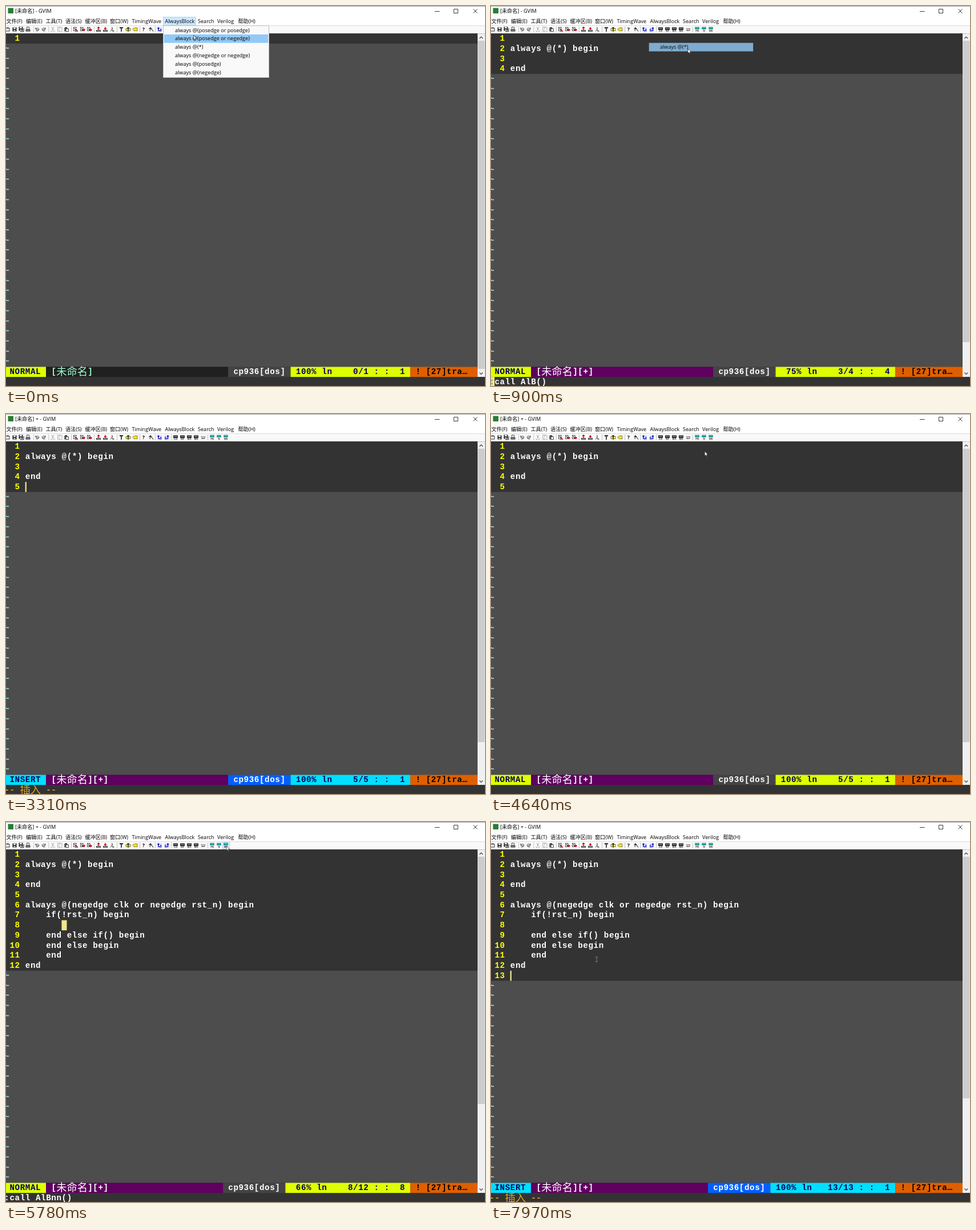
An HTML page for the animation above (8000 ms loop, 839x667 px).

```html
<!DOCTYPE html>
<html lang="zh">
<head>
<meta charset="utf-8">
<title>GVIM</title>
<style>
html, body { margin: 0; width: 100%; height: 100%; overflow: hidden; background: #333; }
svg { display: block; }
text { font: bold 14.2px "Liberation Mono", monospace; letter-spacing: 0.595px; }
.cjk { font: 18.2px "Noto Sans CJK SC", "Noto Sans CJK", sans-serif; letter-spacing: 0; }
.ui { font: 9.1px "Open Sans", "Noto Sans CJK SC", "Noto Sans CJK", sans-serif; letter-spacing: 0; fill: #000; }
</style>
</head>
<body>
<svg id="stage" width="839" height="667" viewBox="0 0 839 667">
  <rect width="839" height="667" fill="#333"/>
  <g id="chrome"></g>
  <g id="hot"></g>
  <g id="icons"></g>
  <g id="editor"></g>
  <g id="caret"></g>
  <g id="menu"></g>
  <g id="mouse"></g>
</svg>
<script>
const LOOP = 8000, CW = 9.115, RH = 17.73, TOP = 48.3, LEFT = -2.85;
const $ = id => document.getElementById(id);
const colX = c => LEFT + c * CW;
const rowY = r => TOP + r * RH;

const rect = (x, y, w, h, fill, extra = '') =>
  `<rect x="${x}" y="${y}" width="${w}" height="${h}" fill="${fill}" ${extra}/>`;
const line = (d, stroke, w = 1) =>
  `<path d="${d}" fill="none" stroke="${stroke}" stroke-width="${w}"/>`;
const esc = s => s.replace(/&/g, '&amp;').replace(/</g, '&lt;');
const ui = (x, y, s) => `<text class="ui" x="${x}" y="${y}">${esc(s)}</text>`;
const mono = (col, row, s, fill) =>
  `<text x="${colX(col) + 0.2}" y="${rowY(row) + 12.8}" fill="${fill}">${esc(s)}</text>`;
const cjk = (col, row, s, fill) =>
  `<text class="cjk" x="${colX(col)}" y="${rowY(row) + 14.5}" fill="${fill}">${s}</text>`;

// ---- window frame, menu bar, toolbar ----
const menuBar = [[0.5, '文件(F)'], [35, '编辑(E)'], [69.5, '工具(T)'], [104, '语法(S)'],
  [138.5, '缓冲区(B)'], [182, '窗口(W)'], [220.5, 'TimingWave'], [278.5, 'AlwaysBlock'],
  [336, 'Search'], [370, 'Verilog'], [406.5, '帮助(H)']];

function drawChrome() {
  $('chrome').innerHTML =
    rect(0, 0, 839, 34, '#fff') + rect(0, 34, 839, TOP - 34, '#f9f9f9') +
    rect(0, 34, 839, 1, '#dcdcdc') + rect(0, 0, 839, 0.8, '#8c8c8c') +
    rect(3.5, 3.5, 9.5, 9.5, '#2a7d32') +
    `<text class="ui" id="title" x="16" y="12"></text>` +
    line('M751 9.5H759.5M784.5 5.5H791.5V12.5H784.5ZM818.5 5.5L825.5 12.5M825.5 5.5L818.5 12.5', '#222', 0.9) +
    rect(275.5, 19.5, 57, 14.5, '#cce8ff', 'id="barHot" stroke="#99d1ff" stroke-width=".8"') +
    menuBar.map(([x, s]) => ui(x, 30, s)).join('');
}

const sheet = (c, w = 5) => rect(-w / 2, -3.5, w, 7, '#fff', `stroke="${c}" stroke-width=".9"`);
const disk = rect(-3.5, -3.5, 7, 7, '#222') + rect(-1.8, -3.2, 3.6, 2.6, '#fff') + rect(-1.5, 1, 3, 2, '#ccc');
const glass = rect(-3.5, -3.5, 4.5, 6, '#fff', 'stroke="#222" stroke-width=".8"') +
  line('M-2 -1.5L1 1.5', '#222', 1.2);
const redArrow = line('M-1 1H4M2 -1L4 1L2 3', '#c00018', 1.3);
const tray = rect(-4, 1, 8, 3, '#333') + rect(-3, 2, 6, 0.8, '#eee');
const loop = s => `<g transform="scale(${s} 1)">${line('M-2.5 -3V0H0M-2 -.5C0 -4 4 -2 3 1C2 3 0 3 -2 2.5M-.5 .8H2', '#333', 1)}</g>`;
const tiny = (s, y, c, size = 4) =>
  `<text class="ui" text-anchor="middle" y="${y}" style="font-size:${size}px;font-weight:700;fill:${c}">${s}</text>`;
const blue = s => rect(-4, -4, 8, 8, '#dfe4ff') + `<g transform="scale(${s} 1)">` +
  line('M-2 3V-3M-3.5 -1.5L-2 -3L-.5 -1.5M-1 2.5H3.5M1 0H3.5', '#1010b0', 1.4) + '</g>';
const chip = s => rect(-4, -3.5, 8, 4.5, '#222') + rect(-3, -1.8, 6, 0.9, '#bbb') + tiny(s, 4, '#222', 3.4);
const teal = s => rect(-3.7, -4.2, 7.4, 4.2, '#108f8f') + rect(-2.5, -3, 5, 0.7, '#9ee') + tiny(s, 4, '#222');

const icons = [
  [3, rect(-4, -2, 7, 5, '#eee', 'stroke="#222" stroke-width=".9"') + line('M-2 -3H2', '#222')],
  [15, disk],
  [27, `<g transform="translate(-1 -1)">${disk}</g>` + line('M4 -2V4H-2', '#222')],
  [38.5, rect(-2, -4, 4, 4, '#fff', 'stroke="#222" stroke-width=".8"') + rect(-4, 0, 8, 3.5, '#333') + rect(-3, 1, 6, 0.8, '#ddd')],
  [54.5, loop(1)], [66.5, loop(-1)],
  [82, line('M-2 -4L1 1.5M2 -4L-1 1.5M-2.5 2A1 1 0 1 0 -1 3M2.5 2A1 1 0 1 1 1 3', '#999', 0.9)],
  [94, `<g transform="translate(-1 -.5)">${sheet('#aaa')}</g><g transform="translate(1.5 .5)">${sheet('#aaa')}</g>`],
  [106, rect(-4, -3, 6, 6.5, '#666') + rect(-2, -4, 2, 2, '#222') + rect(-1, -1, 4.5, 4.8, '#fff', 'stroke="#222" stroke-width=".8"')],
  [122, glass + line('M-1 3L4 3.5M1 0L3.5 3', '#c00018', 1.1)],
  [134, glass + redArrow], [146, glass + redArrow],
  [162, tray + line('M0 1V-4M-2 -2L0 -4L2 -2', '#c00018', 1.4)],
  [174, tray + line('M0 -4V0M-2 -2L0 0L2 -2', '#c00018', 1.4)],
  [186, line('M-1 -3.5A1.5 1.5 0 1 1 -1 -.5L2.5 3.5M0 0L-3 3.5M0 3H3.5', '#333', 1)],
  [202, line('M-3 -2.8H3', '#222', 2) + line('M0 -2V4', '#222', 1.6)],
  [214, rect(-4, -1.5, 8, 4, '#f5e400', 'stroke="#555" stroke-width=".7"') + line('M0 -4V4M-2 -2.5H2', '#222', 1.3)],
  [226, '<path d="M-4.5 0L-2 -2.5H4V2.5H-2Z" fill="#fff000" stroke="#555" stroke-width=".8"/>'],
  [241, tiny('?', 3.4, '#111', 9)],
  [254, line('M-3.5 -.5L-1 -3L1.5 -.5M-1 -3V1M1 0L4 3.5M-3 2H-1', '#222', 1.1)],
  [269, blue(1)], [281.5, blue(-1)],
  ...['CLK', 'INV', 'BUS', 'NEG'].map((s, i) => [297 + 12 * i, chip(s)]),
  [345.5, line('M-4 -1.5H4', '#555', 0.8) + tiny('SEP', 3, '#222')],
  [361, teal('PN')], [373, teal('N')], [385, teal('NN')]
];
const seps = [48, 74.5, 114, 154, 194, 234, 261, 289, 353];

function drawIcons() {
  $('icons').innerHTML =
    icons.map(([x, m]) => `<g transform="translate(${x} 41)">${m}</g>`).join('') +
    seps.map(x => rect(x, 36, 0.8, 10, '#b8b8b8')).join('');
}

// ---- buffer states ----
const code = ['', 'always @(*) begin', '', 'end', '',
  'always @(negedge clk or negedge rst_n) begin', '    if(!rst_n) begin', '',
  '    end else if() begin', '    end else begin', '    end', 'end', ''];

const states = [
  { t: 0, ln: 0, total: 1, col: 1, thumb: 637 },
  { t: 900, ln: 3, total: 4, col: 4, thumb: 590, cmd: ':call AlB()' },
  { t: 2380, ln: 4, total: 4, col: 3, thumb: 590, cmd: ':call AlB()' },
  { t: 3270, ln: 5, total: 5, col: 1, thumb: 576, insert: true },
  { t: 3930, ln: 5, total: 5, col: 1, thumb: 576 },
  { t: 5740, ln: 8, total: 12, col: 8, thumb: 495, cmd: ':call AlBnn()' },
  { t: 6650, ln: 12, total: 12, col: 3, thumb: 495, cmd: ':call AlBnn()' },
  { t: 7290, ln: 13, total: 13, col: 1, thumb: 485, insert: true }
];

function statusBar(s) {
  const changed = s.ln > 0, R = 33;
  const zCol = 56 - String(s.total).length, yCol = zCol - 12;
  const accent = s.insert ? '#00dfff' : '#dfff00', navy = '#00005f';
  const info = changed ? '#fff' : '#9cffd3';
  const band = (a, b, c) => rect(colX(a), rowY(R), colX(b) - colX(a), RH, c);
  const pct = (s.ln ? Math.floor(100 * s.ln / s.total) : 100) + '%';
  const cur = String(s.ln), pos = String(s.col);
  return band(0, 8, accent) + band(8, yCol, changed ? '#5f005f' : '#202020') +
    band(yCol, zCol, s.insert ? '#005fff' : '#444') + band(zCol, 78, accent) +
    rect(colX(78), rowY(R), 826 - colX(78), RH, '#df5f00') +
    mono(1, R, s.insert ? 'INSERT' : 'NORMAL', navy) +
    mono(9, R, '[', info) + cjk(10, R, '未命名', info) + mono(16, R, changed ? '][+]' : ']', info) +
    mono(yCol + 1, R, 'cp936[dos]', '#fff') +
    mono(zCol + 5 - pct.length, R, pct, navy) + mono(zCol + 6, R, 'ln', navy) +
    mono(zCol + 13 - cur.length, R, cur + '/' + s.total + ' : :', navy) +
    mono(77 - pos.length, R, pos, navy) +
    mono(79, R, '! [27]tra…', '#000');
}

function drawEditor(s) {
  let out = rect(0, TOP, 826, 33 * RH, '#4d4d4d') + rect(0, TOP, 826, s.total * RH, '#333');
  for (let r = 0; r < 33; r++) {
    if (r >= s.total) { out += mono(0, r, '~', '#a4e0e0'); continue; }
    const num = String(r + 1), body = code[r].trimStart();
    out += mono(3 - num.length, r, num, '#ff0');
    if (body) out += mono(4 + code[r].length - body.length, r, body, '#fff');
  }
  out += statusBar(s);
  if (s.insert) {
    const gold = '#daa520';
    out += mono(0, 34, '--', gold) + cjk(3, 34, '插入', gold) + mono(8, 34, '--', gold);
  } else if (s.cmd) out += mono(0, 34, s.cmd, '#fff');
  out += rect(826, TOP, 13, 651 - TOP, '#f0f0f0') + rect(826.5, 61, 12, s.thumb - 61, '#cdcdcd') +
    line('M829.5 57L832.3 54.2L835.1 57M829.5 643.5L832.3 646.3L835.1 643.5', '#444', 1.2);
  $('editor').innerHTML = out;
}

// ---- text cursor: time, row, column, shape; time alone means hidden ----
const CMD = 34;
const carets = [[0], [40, 0, 0], [440], [690, 0, 0], [900, CMD, -4], [930, 2, 3], [1590],
  [1860, 2, 3], [2230], [2380, 3, 2], [3050], [3270, 4, 0, 'bar'], [3930, 4, 0], [4640],
  [4890, 4, 0], [5290], [5740, CMD, -4], [5775, 7, 7], [6450], [6650, 11, 2], [7290, 12, 0, 'bar']];

function drawCaret([, row, col, shape]) {
  if (row === undefined) { $('caret').innerHTML = ''; return; }
  const ch = row === CMD ? ':' : (code[row][col] || '');
  $('caret').innerHTML =
    rect(colX(col + 4), rowY(row), shape ? 2.3 : CW, RH, '#f0e68c') +
    (ch && !shape ? mono(col + 4, row, ch, '#708090') : '');
}

// ---- drop-down menu ----
const items = ['posedge or posedge', 'posedge or negedge', '*', 'negedge or negedge', 'posedge', 'negedge']
  .map(s => `always @(${s})`);
const IH = 14.87, MENU_TOP = 35;
const item = i => ui(296, MENU_TOP + IH * i + 10.6, items[i]);
const itemHot = i => rect(276.7, MENU_TOP + IH * i, 182.5, IH, '#91c9f7');

function drawMenu(t, y) {
  $('barHot').setAttribute('visibility', t < 900 ? 'visible' : 'hidden');
  let out = '';
  if (t < 900) {
    const hot = Math.floor((y - MENU_TOP) / IH);
    out = rect(275.5, 34.5, 185, 91, '#f9f9f9', 'stroke="#bdbdbd"') +
      itemHot(hot) + items.map((_, i) => item(i)).join('');
  } else if (t < 1170) {
    const a = 0.8 * (1 - Math.max(0, t - 930) / 240);
    out = `<g opacity="${a.toFixed(3)}">${itemHot(2)}${item(2)}</g>`;
  }
  if (out !== drawMenu.last) $('menu').innerHTML = drawMenu.last = out;
}

// ---- mouse ----
const path = [[0, 328.5, 51], [40, 328.5, 51], [41, 332, 67], [200, 339, 84], [420, 339, 84],
  [710, 345, 75], [930, 345, 75], [1190, 369.3, 143], [1860, 369.3, 143], [2230, 363, 114],
  [3930, 363, 114], [4640, 374.3, 65.5], [4700, 374.3, 65.5], [4780, 376, 51], [5100, 383, 44],
  [5450, 386, 42], [5870, 386, 42], [6150, 302, 128], [6450, 186, 250], [6590, 186, 250],
  [6730, 175, 248], [7880, 177, 249], [7970, 185, 241], [LOOP, 185, 241]];

function mouseAt(t) {
  const i = Math.max(1, path.findIndex(p => p[0] > t));
  const [t0, x0, y0] = path[i - 1], [t1, x1, y1] = path[i];
  const k = (t - t0) / (t1 - t0);
  return [x0 + (x1 - x0) * k, y0 + (y1 - y0) * k];
}

function drawMouse(t, x, y) {
  const hidden = (t >= 3250 && t < 3930) || (t >= 7240 && t < 7880);
  const beam = t >= 7880;
  $('mouse').setAttribute('visibility', hidden ? 'hidden' : 'visible');
  $('mouse').setAttribute('transform', `translate(${x.toFixed(2)} ${y.toFixed(2)})`);
  if (beam !== drawMouse.beam) {
    drawMouse.beam = beam;
    $('mouse').innerHTML = beam
      ? line('M-2.2 -4H2.2M0 -4V4M-2.2 4H2.2', '#a0a0a0', 0.7)
      : '<path d="M0 0V8L1.8 6.3L3 9L4.3 8.4L3.1 5.8H5.6Z" fill="#fff" stroke="#111" stroke-width=".6"/>';
  }
  const hot = y < 48 && t > 4700 ? (x < 379 ? 373 : 385) : 0;
  if (hot !== drawMouse.hot) {
    drawMouse.hot = hot;
    $('hot').innerHTML = hot ? rect(hot - 6, 35.4, 12.4, 11.8, '#d3eafc', 'stroke="#99d1ff" stroke-width=".7"') : '';
  }
}

// ---- loop ----
const latest = (list, t, key) => list.filter(e => e[key] <= t).pop();
let shownState, shownCaret;

function render(t) {
  const s = latest(states, t, 't'), c = latest(carets, t, 0);
  if (s !== shownState) drawEditor(shownState = s);
  if (c !== shownCaret) drawCaret(shownCaret = c);
  const title = t < 930 ? '[未命名] - GVIM' : '[未命名] + - GVIM';
  if ($('title').textContent !== title) $('title').textContent = title;
  const [x, y] = mouseAt(t);
  drawMenu(t, y);
  drawMouse(t, x, y);
}

drawChrome();
drawIcons();
const start = performance.now();
function tick() {
  render((performance.now() - start) % LOOP);
  requestAnimationFrame(tick);
}
render(0);
requestAnimationFrame(tick);
</script>
</body>
</html>
```
